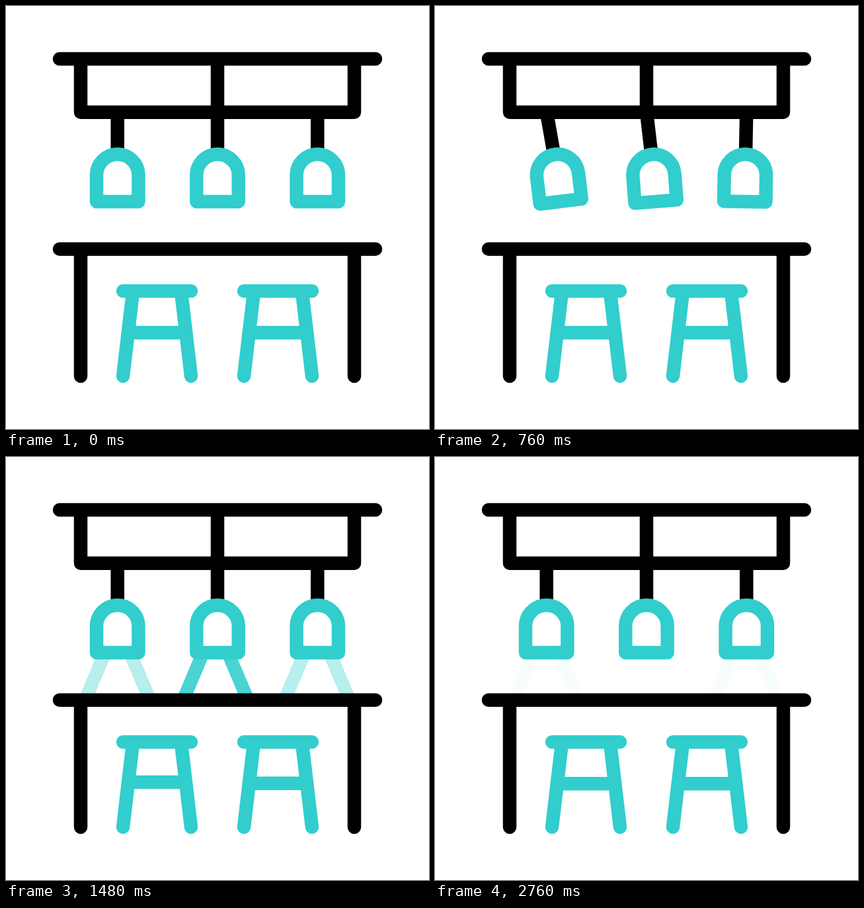
An HTML page that plays this animation: 640x640 px, repeating every 3000 ms.

```html
<!DOCTYPE html>
<html lang="en">
<head>
<meta charset="utf-8">
<title>Bar counter</title>
<style>
  html, body { margin: 0; width: 100%; height: 100%; overflow: hidden; background: #fff; }
  svg { display: block; width: 100vw; height: 100vh; }
  .ink, .teal { fill: none; stroke-width: 20.5; stroke-linejoin: round; }
  .ink { stroke: #000; }
  .teal { stroke: #32cdcd; }
  .round { stroke-linecap: round; }
</style>
</head>
<body>
<svg id="stage" viewBox="0 0 640 640">
  <g id="beams" class="teal" style="stroke-width:20"></g>
  <g id="rack">
    <g id="rods" class="ink"></g>
    <path class="ink round" d="M81 80H559M113 80V160.7H527V80M320 80V160.7"/>
    <g id="lamps" class="teal"></g>
  </g>
  <path class="ink round" d="M81 367.8H559M113 367.8V560M527 367.8V560"/>
  <g id="stools" class="teal round"></g>
</svg>
<script>
const LOOP = 3000, STEP = 40;
const NS = "http://www.w3.org/2000/svg";

function addPath(id, d = "") {
  const p = document.createElementNS(NS, "path");
  p.setAttribute("d", d);
  document.getElementById(id).appendChild(p);
  return p;
}

const ease = u => u * u * (3 - 2 * u);

// keys: [time, value] pairs in order
function track(keys, t, curve = ease) {
  if (t <= keys[0][0]) return keys[0][1];
  for (let i = 1; i < keys.length; i++) {
    const [t0, a] = keys[i - 1], [t1, b] = keys[i];
    if (t < t1) return a + (b - a) * curve((t - t0) / (t1 - t0));
  }
  return keys[keys.length - 1][1];
}

const rackKeys = [[80, 0], [240, 7.5], [440, -21.5], [640, 0]];
const swingKeys = [[0, 0], [285, 7.3], [702, -7.3], [1099, 0]];
const sideGlow = [[1160, 0], [1300, 1], [1480, 0.35], [1660, 1], [2440, 1], [2760, 0.04]];
const midGlow = [[1240, 0], [1500, 0.95], [1600, 1], [2440, 1], [2720, 0]];
const barKeys = [[0, 0], [340, -15], [680, 0]];

const lamps = [
  { x: 168.7, start: 100, glow: sideGlow, beamX: 168.7 },
  { x: 320, start: 175, glow: midGlow, beamX: 317 },
  { x: 471.3, start: 285, glow: sideGlow, beamX: 470.7 }
];
for (const l of lamps) {
  l.beam = addPath("beams",
    `M${l.beamX - 18.7} 296L${l.beamX - 49.2} 368M${l.beamX + 18.7} 296L${l.beamX + 49.2} 368`);
  l.rod = addPath("rods");
  l.shade = addPath("lamps", "M-31.7 40V0A31.7 31.7 0 0 1 31.7 0V40Z");
}

const stools = [{ x: 228.5, start: 1400 }, { x: 411.5, start: 1440 }];
for (const s of stools) {
  addPath("stools", `M${s.x - 51.5} 431.3h103` +
    `M${s.x - 36.3} 431.3L${s.x - 51.5} 560M${s.x + 36.3} 431.3L${s.x + 51.5} 560`);
  s.bar = addPath("stools");
}

const rack = document.getElementById("rack");

function draw(t) {
  rack.setAttribute("transform", `translate(0 ${track(rackKeys, t)})`);

  for (const l of lamps) {
    const angle = track(swingKeys, t - l.start);
    const dx = angle * (angle > 0 ? -1.95 : -2.45);
    l.rod.setAttribute("d", `M${l.x} 160L${l.x + dx * 0.65} 222`);
    l.shade.setAttribute("transform", `translate(${l.x + dx} 256) rotate(${angle})`);
    l.beam.setAttribute("opacity", track(l.glow, t, u => u));
  }

  for (const s of stools) {
    const y = 494.2 + track(barKeys, t - s.start);
    const half = 51.5 - (560 - y) * 0.118;
    s.bar.setAttribute("d", `M${s.x - half} ${y}H${s.x + half}`);
  }
}

const origin = performance.now();
function tick() {
  const t = (performance.now() - origin) % LOOP;
  draw(Math.floor(t / STEP) * STEP);
  requestAnimationFrame(tick);
}
tick();
</script>
</body>
</html>
```
